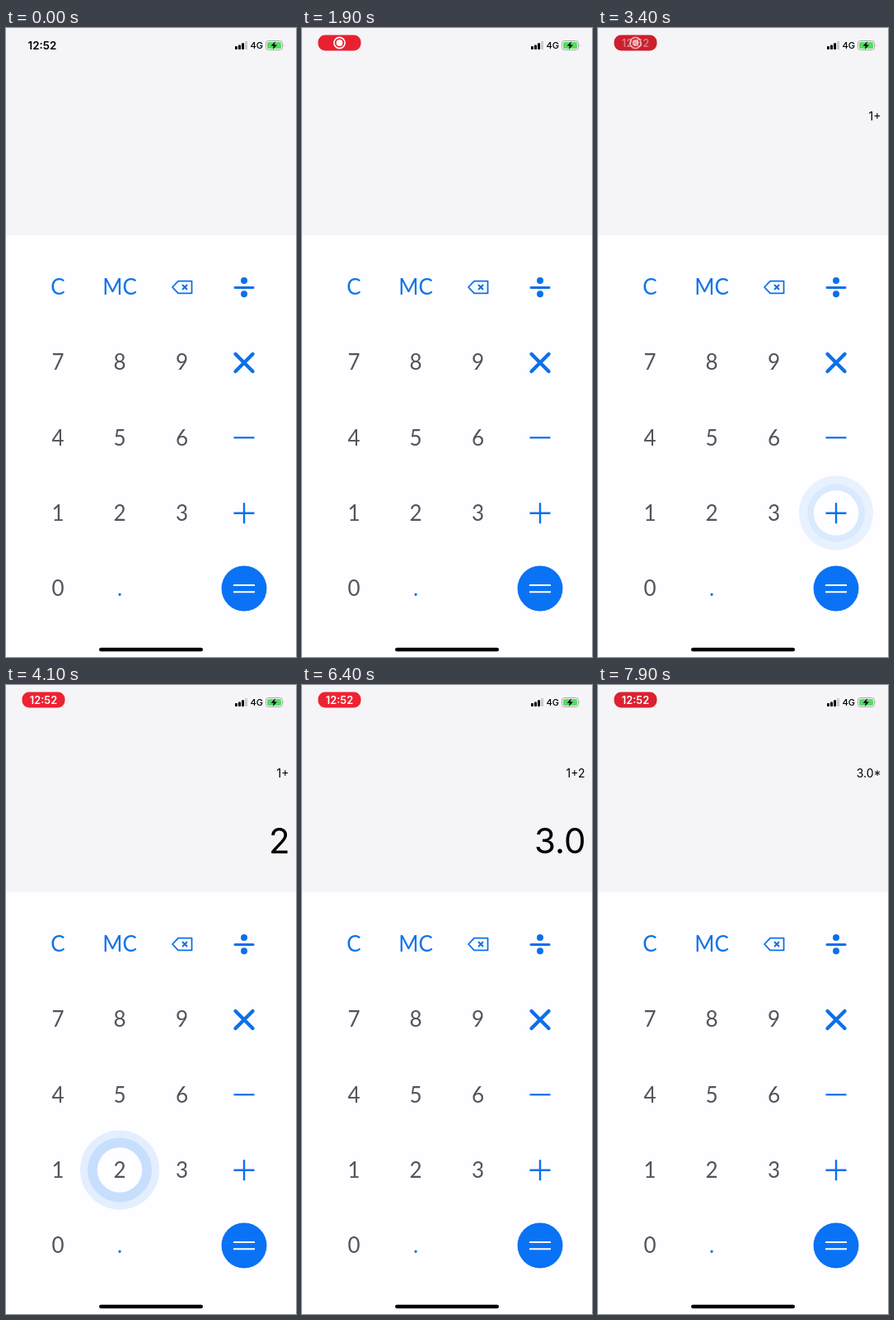
An HTML page for the animation above (8 s loop, 352 by 762 pixels).

```html
<!DOCTYPE html>
<html lang="en">
<head>
<meta charset="utf-8">
<title>Calculator</title>
<style>
  html, body { margin: 0; width: 100%; height: 100%; overflow: hidden; background: #fefdff; }
  svg { display: block; width: 352px; height: 762px; }
  text { font-family: Inter, "Liberation Sans", sans-serif; }
  #keys text { font: 400 26px Lato, "Open Sans", sans-serif; fill: #545458; text-anchor: middle; }
  #keys .blue { fill: #0f74e6; }
  .line { fill: none; stroke: #0b70e8; }
  .end { text-anchor: end; }
  .mid { text-anchor: middle; }
</style>
</head>
<body>
<svg viewBox="0 0 352 762">
  <rect width="352" height="762" fill="#fefdff"/>
  <rect width="352" height="251" fill="#f5f4f7"/>

  <text id="clock" class="mid" x="44" y="26" font-size="13.4" font-weight="600">12:52</text>
  <g id="pill">
    <rect id="pillBack" x="19.5" y="8.5" width="52" height="19" rx="8.5"/>
    <g id="record">
      <circle cx="45.5" cy="18" r="6.6" fill="none" stroke="#fff" stroke-width="1.6"/>
      <circle cx="45.5" cy="18" r="3.9" fill="#fff"/>
    </g>
    <text id="pillTime" class="mid" x="45.5" y="22.6" font-size="12.8" font-weight="600" fill="#fff">12:52</text>
  </g>

  <g id="signal">
    <rect x="278" y="22" width="3" height="4" rx=".8"/>
    <rect x="282" y="20.5" width="3" height="5.5" rx=".8"/>
    <rect x="286" y="18.3" width="3" height="7.7" rx=".8"/>
    <rect x="290" y="16" width="3" height="10" rx=".8" fill="#c9c8cc"/>
  </g>
  <text x="296.5" y="25" font-size="11" font-weight="500">4G</text>
  <g id="battery">
    <rect x="315.5" y="15.5" width="20" height="11" rx="3" fill="none" stroke="#a9a9ac"/>
    <rect x="317" y="17" width="17" height="8" rx="1.7" fill="#56dc62"/>
    <path d="M336.6 19.2q1.5 1.8 0 3.6z" fill="#a9a9ac"/>
    <path d="M326.8 16.2l-5.2 5.5h3.3l-1.1 4.4 5.2-5.6h-3.3z"/>
  </g>

  <text id="history" class="end" x="343.5" y="112" font-size="14"></text>
  <text id="value" class="end" x="344.5" y="204" font-size="42"></text>

  <g id="ripples"></g>
  <g id="keys"></g>
  <g id="operators">
    <path class="line" stroke-width="1.8" stroke-linejoin="round" d="M202 314l7-7.3h16.5v14.6h-16.5z"/>
    <path class="line" stroke-width="2" d="M214 311l6 6m0-6l-6 6"/>
    <path class="line" stroke-width="3" stroke-linecap="round" d="M278 314.5h22"/>
    <circle cx="289" cy="306" r="4" fill="#0b70e8"/>
    <circle cx="289" cy="322.3" r="4" fill="#0b70e8"/>
    <path class="line" stroke-width="4.4" stroke-linecap="round" d="M278.5 395l21 21m0-21l-21 21"/>
    <path class="line" stroke-width="2.2" d="M276.5 496.3h25"/>
    <path class="line" stroke-width="2.4" d="M276.5 587.8h25m-12.5-12.5v25"/>
    <circle cx="289" cy="679" r="27.5" fill="#0a72f5"/>
    <path d="M276 675h26m-26 8.3h26" stroke="#fff" stroke-width="2.1"/>
  </g>

  <rect x="113" y="750.7" width="126" height="4.6" rx="2.3"/>
</svg>
<script>
  const LOOP = 8000, STEP = 100;
  const $ = id => document.getElementById(id);
  const columns = [63, 138, 213.5, 289];
  const rows = [314, 405, 496.5, 587.5, 679];

  const labels = [["C", "MC"], ["7", "8", "9"], ["4", "5", "6"], ["1", "2", "3"], ["0", "."]];

  // Ripple stages: ms since touch, outer radius, inner radius, strength
  const fullPress = [[0, 30, 27, 0], [100, 45, 35, .5], [200, 48, 39, 1], [550, 48, 43, 0]];
  const quickTap = [[0, 30, 27, 0], [100, 45, 36.5, .6], [350, 45, 40, 0]];

  const presses = [
    { at: 2500, col: 0, row: 3, stages: fullPress },
    { at: 3300, col: 3, row: 3, stages: fullPress },
    { at: 3900, col: 1, row: 3, stages: fullPress },
    { at: 5000, col: 3, row: 4, stages: quickTap },
    { at: 6600, col: 3, row: 1, stages: fullPress }
  ];

  // Time, upper line, lower line
  const screens = [
    [0, "", ""], [2600, "", "1"], [3300, "1+", ""], [4000, "1+", "2"],
    [5000, "1+2", "3.0"], [6700, "3.0*", ""]
  ];

  function add(parent, tag, attrs, text = "") {
    const node = document.createElementNS("http://www.w3.org/2000/svg", tag);
    for (const name in attrs) node.setAttribute(name, attrs[name]);
    node.textContent = text;
    return parent.appendChild(node);
  }

  labels.forEach((line, row) => line.forEach((label, col) =>
    add($("keys"), "text", {
      x: columns[col],
      y: rows[row] + 9,
      class: row === 0 || label === "." ? "blue" : "digit"
    }, label)));

  for (const press of presses) {
    const place = { cx: columns[press.col], cy: rows[press.row] };
    press.group = add($("ripples"), "g", {});
    press.outer = add(press.group, "circle", { ...place, fill: "#0a74f4" });
    press.inner = add(press.group, "circle", { ...place, fill: "#0a74f4" });
    add(press.group, "circle", { ...place, r: 27.3, fill: "#fefdff" });
  }

  const ramp = (t, from, to) => Math.min(1, Math.max(0, (t - from) / (to - from)));

  function stageAt(stages, t) {
    const next = stages.findIndex(s => s[0] > t);
    if (next < 1) return null;
    const a = stages[next - 1], b = stages[next];
    const p = ramp(t, a[0], b[0]);
    return a.map((v, i) => v + (b[i] - v) * p);
  }

  function drawPress(press, t) {
    const stage = stageAt(press.stages, t - press.at);
    press.group.style.display = stage && stage[3] > 0 ? "" : "none";
    if (!stage) return;
    const [, outer, inner, strength] = stage;
    press.outer.setAttribute("r", outer);
    press.inner.setAttribute("r", inner);
    press.outer.setAttribute("opacity", .11 * Math.min(1, strength * 1.6));
    press.inner.setAttribute("opacity", .13 * strength);
  }

  function drawPill(t) {
    const glow = .5 + .5 * Math.cos((t - 2180) / 2080 * 2 * Math.PI);
    const mix = (dark, bright) => Math.round(dark + (bright - dark) * glow);
    $("pillBack").setAttribute("fill", `rgb(${mix(200, 239)},${mix(31, 34)},${mix(46, 50)})`);
    $("clock").setAttribute("opacity", 1 - ramp(t, 0, 300));
    $("pill").setAttribute("opacity", ramp(t, 0, 400));
    $("record").setAttribute("opacity", 1 - ramp(t, 3200, 3700));
    $("pillTime").setAttribute("opacity", ramp(t, 3200, 3700));
  }

  function render(t) {
    const [, history, value] = screens.filter(s => s[0] <= t).pop();
    $("history").textContent = history;
    $("value").textContent = value;
    presses.forEach(press => drawPress(press, t));
    drawPill(t);
  }

  const start = performance.now();
  function tick() {
    const t = (performance.now() - start) % LOOP;
    render(Math.floor(t / STEP) * STEP);
    requestAnimationFrame(tick);
  }
  tick();
</script>
</body>
</html>
```
